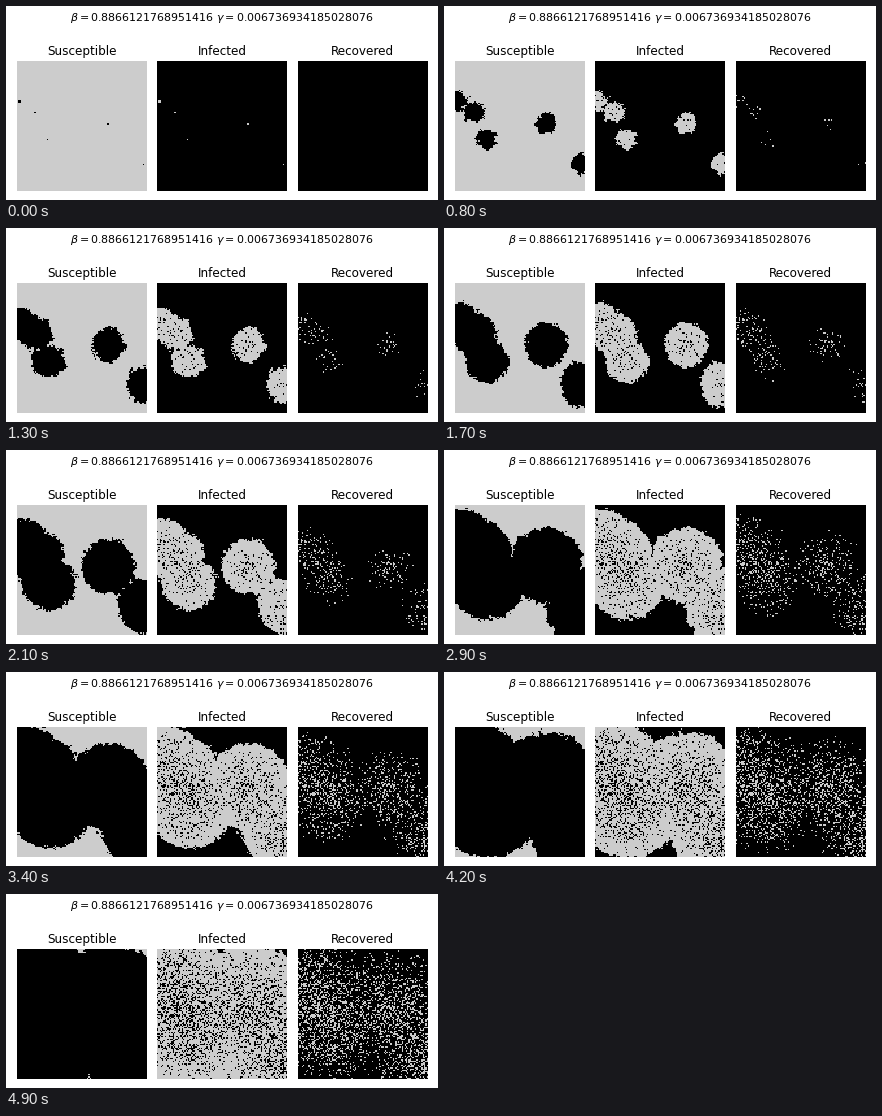
Recreate the animation shown at these times as a matplotlib script. Size 432 by 194 pixels, loop 5 s.

```python
import numpy as np
import matplotlib.pyplot as plt
from matplotlib.animation import FuncAnimation

WIDTH, HEIGHT, DPI = 432, 194, 72
N, FRAMES, INTERVAL = 100, 50, 100
BETA, GAMMA = "0.8866121768951416", "0.006736934185028076"
RECOVERY_RATE = 0.0115
PAD = 10.8
PANEL = (WIDTH - 4 * PAD) / 3
OUTBREAKS = [(1.5, 30.5), (13.5, 39), (23, 60), (69.5, 48), (97, 79)]

rng = np.random.default_rng(4)
rows, cols = np.mgrid[:N, :N]


def travel_time(x, y):
    """Frames until an outbreak at x, y gets to each cell; it leans inward and up."""
    dx, dy = cols - x, y - rows
    dist = np.hypot(dx, dy)
    reach = np.maximum(dist, 1e-9)
    rightward = np.maximum(dx, 0) / reach
    upward = np.maximum(dy, 0) / reach
    speed = 0.94 + 0.12 * rightward * (1 - x / N) + 0.16 * upward * x / N
    return dist / speed


def rough_edges():
    fine, coarse = rng.normal(size=(2, N, N))
    shifts = range(-1, 2)
    coarse = sum(np.roll(coarse, (i, j), (0, 1)) for i in shifts for j in shifts) / 3
    return 0.55 * fine + 0.85 * coarse


distance = np.min([travel_time(x, y) for x, y in OUTBREAKS], axis=0)
infected_at = np.maximum(np.ceil(distance + rough_edges()), 1)
infected_at[distance < 0.8] = 0
recovered_at = infected_at + rng.geometric(RECOVERY_RATE, (N, N))


def states(t):
    infected, recovered = infected_at <= t, recovered_at <= t
    return ~infected, infected & ~recovered, recovered


plt.rcParams["font.family"] = "DejaVu Sans"
# The small excess keeps the height from being rounded down a pixel.
fig = plt.figure(figsize=(WIDTH / DPI, (HEIGHT + 0.01) / DPI), dpi=DPI, facecolor="white")
fig.text(0.5, 1 - 15 / HEIGHT, rf"$\beta = ${BETA} $\gamma = ${GAMMA}",
         fontsize=11, ha="center", va="baseline")

images = []
for i, title in enumerate(("Susceptible", "Infected", "Recovered")):
    left = PAD + i * (PANEL + PAD)
    ax = fig.add_axes([left / WIDTH, 9.2 / HEIGHT, PANEL / WIDTH, PANEL / HEIGHT])
    ax.set_title(title, fontsize=12, pad=6)
    ax.axis("off")
    images.append(ax.imshow(np.zeros((N, N)), cmap="gray", vmin=0, vmax=1.25,
                            interpolation="nearest", aspect="auto"))


def update(t):
    for image, state in zip(images, states(t)):
        image.set_data(state.astype(float))
    return images


anim = FuncAnimation(fig, update, frames=FRAMES, interval=INTERVAL, repeat=True,
                     repeat_delay=0, blit=False)
plt.show()
```
